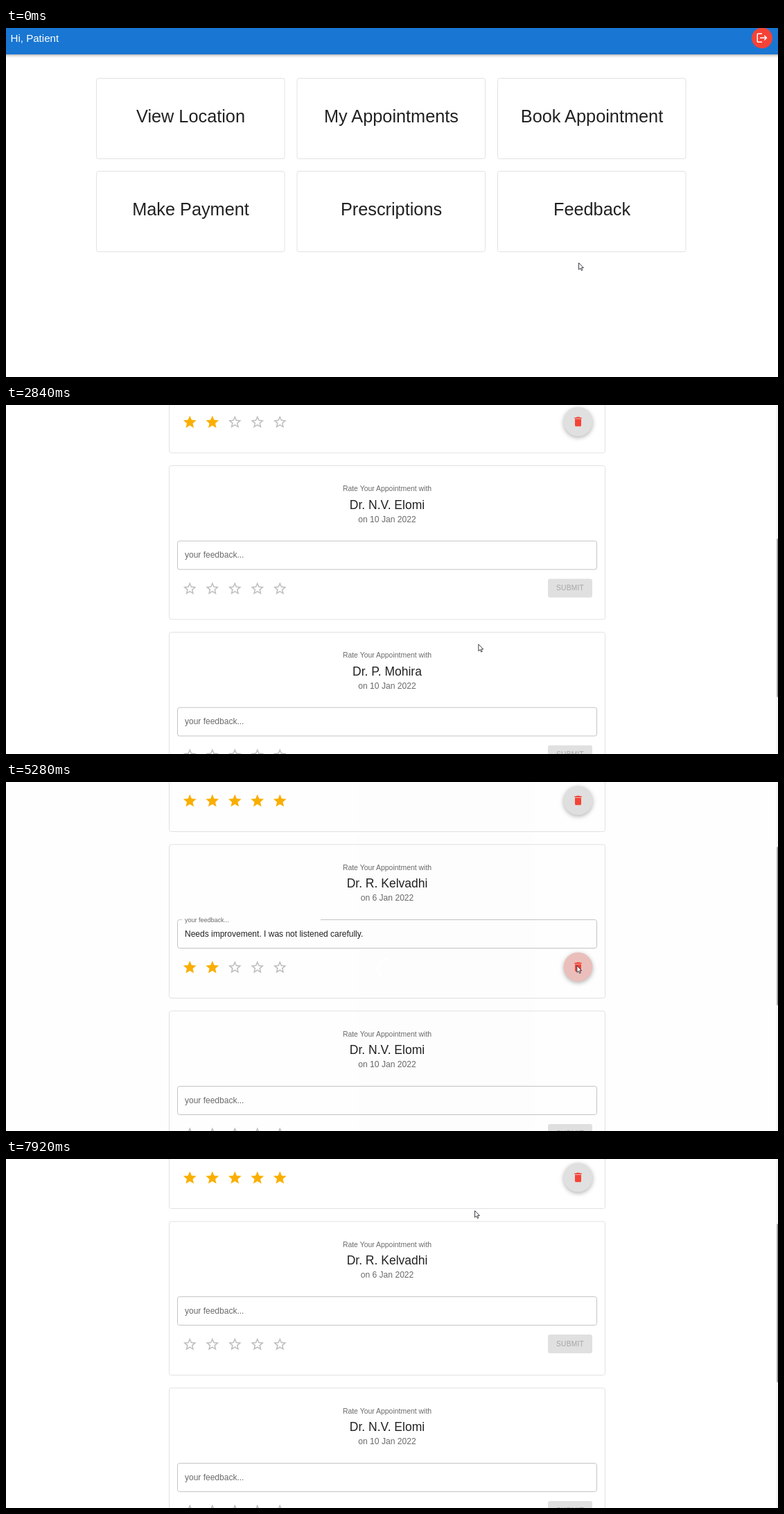
Recreate the animation shown at these times as an HTML page. Size 1114 by 503 pixels, loop 7990 ms.

```html
<!DOCTYPE html>
<html lang="en">
<head>
<meta charset="utf-8">
<title>Patient feedback</title>
<style>
  html, body { margin: 0; width: 100%; height: 100%; overflow: hidden; background: #fff; }
  svg { display: block; width: 100vw; height: 100vh; }
  text { font-family: "Liberation Sans", Arial, sans-serif; fill: #212121; }
  .mid { text-anchor: middle; }
  .muted { fill: #6a6a6a; }
  .card { fill: #fff; stroke: #e2e2e2; }
  .field { fill: none; stroke: #c4c4c4; }
  .bar { filter: drop-shadow(0 1.5px 2px rgba(0,0,0,.4)); }
  .fab { filter: drop-shadow(0 2.5px 3px rgba(0,0,0,.3)); }
</style>
</head>
<body>
<svg id="stage" viewBox="0 0 1114 503" preserveAspectRatio="none"></svg>
<script>
const LOOP = 7990;
const OPEN = 490, LOADED = 2080, HOVER = 5200, DELETE = 5270, DELETED = 7200;
const SPIN = 1520;

const ICON = {
  star: "M12 17.27L18.18 21l-1.64-7.03L22 9.24l-7.19-.61L12 2 9.19 8.63 2 9.24l5.46 4.73L5.82 21z",
  hollow: "M22 9.24l-7.19-.62L12 2 9.19 8.63 2 9.24l5.46 4.73L5.82 21 12 17.27 18.18 21l-1.63-7.03L22 9.24z" +
    "M12 15.4l-3.76 2.27 1-4.28-3.32-2.88 4.38-.38L12 6.1l1.71 4.04 4.38.38-3.32 2.88 1 4.28L12 15.4z",
  bin: "M6 19c0 1.1.9 2 2 2h8c1.1 0 2-.9 2-2V7H6v12zM19 4h-3.5l-1-1h-5l-1 1H5v2h14V4z",
  exit: "M17 7l-1.41 1.41L18.17 11H8v2h10.17l-2.58 2.58L17 17l5-5z" +
    "M4 5h8V3H4c-1.1 0-2 .9-2 2v14c0 1.1.9 2 2 2h8v-2H4V5z"
};

// Markup helpers
const text = (x, y, size, str, cls = "") =>
  `<text x="${x}" y="${y}" font-size="${size}" class="${cls}">${str}</text>`;
const box = (x, y, w, h, cls) =>
  `<rect x="${x}" y="${y}" width="${w}" height="${h}" rx="3" class="${cls}"/>`;
const icon = (name, x, y, scale, fill) =>
  `<path d="${ICON[name]}" transform="translate(${x} ${y}) scale(${scale})" fill="${fill}" fill-rule="evenodd"/>`;

function tile(label, i) {
  const x = 130.5 + (i % 3) * 289.5, y = 72.5 + Math.floor(i / 3) * 134;
  return box(x, y, 271.5, 116, "card") + text(x + 136, y + 63, 25.3, label, "mid");
}

function stars(count) {
  return [0, 1, 2, 3, 4].map(i => {
    const on = i < count;
    return icon(on ? "star" : "hollow", 254 + i * 32.5, 165.8, .9375, on ? "#faaf00" : "#bdbdbd");
  }).join("");
}

function emptyForm() {
  return box(247.5, 108.5, 605, 41, "field") +
    text(258, 132.5, 12, "your feedback...", "muted") + stars(0) +
    `<rect x="782" y="163" width="64" height="27" rx="3" fill="#e0e0e0"/>` +
    `<text x="794" y="179.9" font-size="10.2" letter-spacing=".25" style="fill:#a6a6a6">SUBMIT</text>`;
}

function sentForm(comment, rating) {
  return `<path class="field" d="M254 108.5H250.5a3 3 0 0 0-3 3v35a3 3 0 0 0 3 3h599a3 3 0 0 0 3-3v-35a3 3 0 0 0-3-3H454"/>` +
    text(258, 111.7, 9, "your feedback...", "muted") +
    text(258, 132.7, 12, comment) + stars(rating) +
    `<circle class="fab" cx="825.5" cy="176.5" r="21" fill="#e0e0e0"/>` +
    icon("bin", 816.5, 167.5, .75, "#f44336");
}

function card(i, doctor, date, body) {
  return `<g transform="translate(0 ${79 + i * 240})">` +
    box(235.5, 0, 629, 221.5, "card") +
    text(550, 36.8, 10.45, "Rate Your Appointment with", "mid muted") +
    text(550, 62.3, 17.5, doctor, "mid") +
    text(550, 81.3, 12.1, "on " + date, "mid muted") + body + `</g>`;
}

const tiles = ["View Location", "My Appointments", "Book Appointment",
  "Make Payment", "Prescriptions", "Feedback"];

document.getElementById("stage").innerHTML = `
  <rect width="1114" height="503" fill="#fff"/>
  <g id="menu">${tiles.map(tile).join("")}</g>
  <g id="list">
    ${card(0, "Dr. L. Tamore", "4 Jan 2022", sentForm("Very good experience. Thank you doctor.", 5))}
    ${card(1, "Dr. R. Kelvadhi", "6 Jan 2022",
      `<g id="sent">${sentForm("Needs improvement. I was not listened carefully.", 2)}</g>
       <g id="blank">${emptyForm()}</g>`)}
    ${card(2, "Dr. N.V. Elomi", "10 Jan 2022", emptyForm())}
    ${card(3, "Dr. P. Mohira", "10 Jan 2022", emptyForm())}
    ${card(4, "Dr. N.V. Elomi", "10 Jan 2022", emptyForm())}
  </g>
  <g id="header">
    <rect class="bar" x="-10" y="-10" width="1134" height="48" fill="#1976d2"/>
    <text x="6.5" y="19.8" font-size="15.1" style="fill:#fff">Hi, Patient</text>
    <g id="logout"><circle cx="1091" cy="14.5" r="15" fill="#f44336"/>${icon("exit", 1082, 5.3, .75, "#fff")}</g>
  </g>
  <g id="loader">
    <rect id="shade" height="503" fill="#000" fill-opacity=".5"/>
    <path id="arc" fill="none" stroke="#fff" stroke-width="2.6"/>
  </g>
  <g id="scrollbar">
    <rect x="1111" width="3" height="503" fill="#f6f6f6"/>
    <rect id="thumb" x="1112.3" width="3" height="228" fill="#9a9a9a"/>
  </g>
  <path id="cursor" d="M.5 .5V10.2L2.8 8.2 4.4 11.6 5.9 10.9 4.4 7.6H7.4Z" fill="#fff" stroke="#2b2b36" stroke-width=".9"/>`;

const el = {};
document.querySelectorAll("[id]").forEach(n => el[n.id] = n);
const fab = el.sent.querySelector(".fab");

// Each key: time, then the values reached at that time
const SCROLL = [[2350, 0], [3050, 600], [3180, 600], [3380, 746], [3580, 746], [4200, 234.5], [4330, 229]];
const CURSOR = [[70, 826, 338], [450, 830, 289], [630, 830, 289], [840, 691, 362], [2080, 691, 362],
  [3050, 680, 342], [3380, 679, 342], [4200, 681, 341], [4330, 705, 357], [5140, 828, 262],
  [5250, 828, 262], [5440, 763, 293], [5700, 714, 271], [6800, 714, 213], [7620, 714, 213], [7900, 676, 74]];

const clamp = u => Math.min(1, Math.max(0, u));
const ease = u => (u = clamp(u), u * u * (3 - 2 * u));
const fade = u => 1 - (1 - ease(u)) ** 1.6;

function track(keys, t) {
  const next = keys.findIndex(k => k[0] > t);
  if (next < 0) return keys[keys.length - 1].slice(1);
  if (next === 0) return keys[0].slice(1);
  const a = keys[next - 1], b = keys[next];
  const u = ease((t - a[0]) / (b[0] - a[0]));
  return a.slice(1).map((v, i) => v + (b[i + 1] - v) * u);
}

// Indeterminate ring: grows in the first half turn, catches up in the second
function ring(cx, age) {
  const TURN = 126.9, R = 13.6, cy = 268.5;
  const p = ((age % SPIN) + SPIN) % SPIN / SPIN;
  const grow = ease(p * 2), chase = ease(p * 2 - 1);
  const from = 15 * grow + 110 * chase;
  const to = Math.min(TURN, from + Math.max(6, 100 * grow));
  const point = s => {
    const a = (p + s / TURN) * 2 * Math.PI;
    return `${(cx + R * Math.cos(a)).toFixed(2)} ${(cy + R * Math.sin(a)).toFixed(2)}`;
  };
  return `M${point(from)}A${R} ${R} 0 ${to - from > TURN / 2 ? 1 : 0} 1 ${point(to)}`;
}

const show = (node, on) => node.setAttribute("display", on ? "inline" : "none");
const move = (node, x, y) => node.setAttribute("transform", `translate(${x} ${y})`);

function draw(t) {
  const listed = t >= LOADED, deleted = t >= DELETED;
  const [scroll] = track(SCROLL, t);

  show(el.menu, t < OPEN);
  show(el.list, listed);
  show(el.scrollbar, listed);
  show(el.sent, !deleted);
  show(el.blank, deleted);
  fab.setAttribute("fill", t >= HOVER ? "#ebc0bc" : "#e0e0e0");

  move(el.list, 0, -scroll);
  move(el.header, 0, -scroll);
  move(el.logout, listed ? -13 : 0, 0);
  el.thumb.setAttribute("y", scroll * .409);

  const veil = listed
    ? fade((t - DELETE) / 225) * (1 - fade((t - DELETED) / 195))
    : fade((t - OPEN) / 225);
  show(el.loader, veil > 0);
  el.loader.setAttribute("opacity", veil);
  el.shade.setAttribute("width", listed ? 1111 : 1114);
  el.arc.setAttribute("d", listed ? ring(550, t - 4870) : ring(556.5, t - OPEN));

  move(el.cursor, ...track(CURSOR, t));
}

const start = performance.now();
function tick() {
  draw((performance.now() - start) % LOOP);
  requestAnimationFrame(tick);
}
tick();
</script>
</body>
</html>
```
